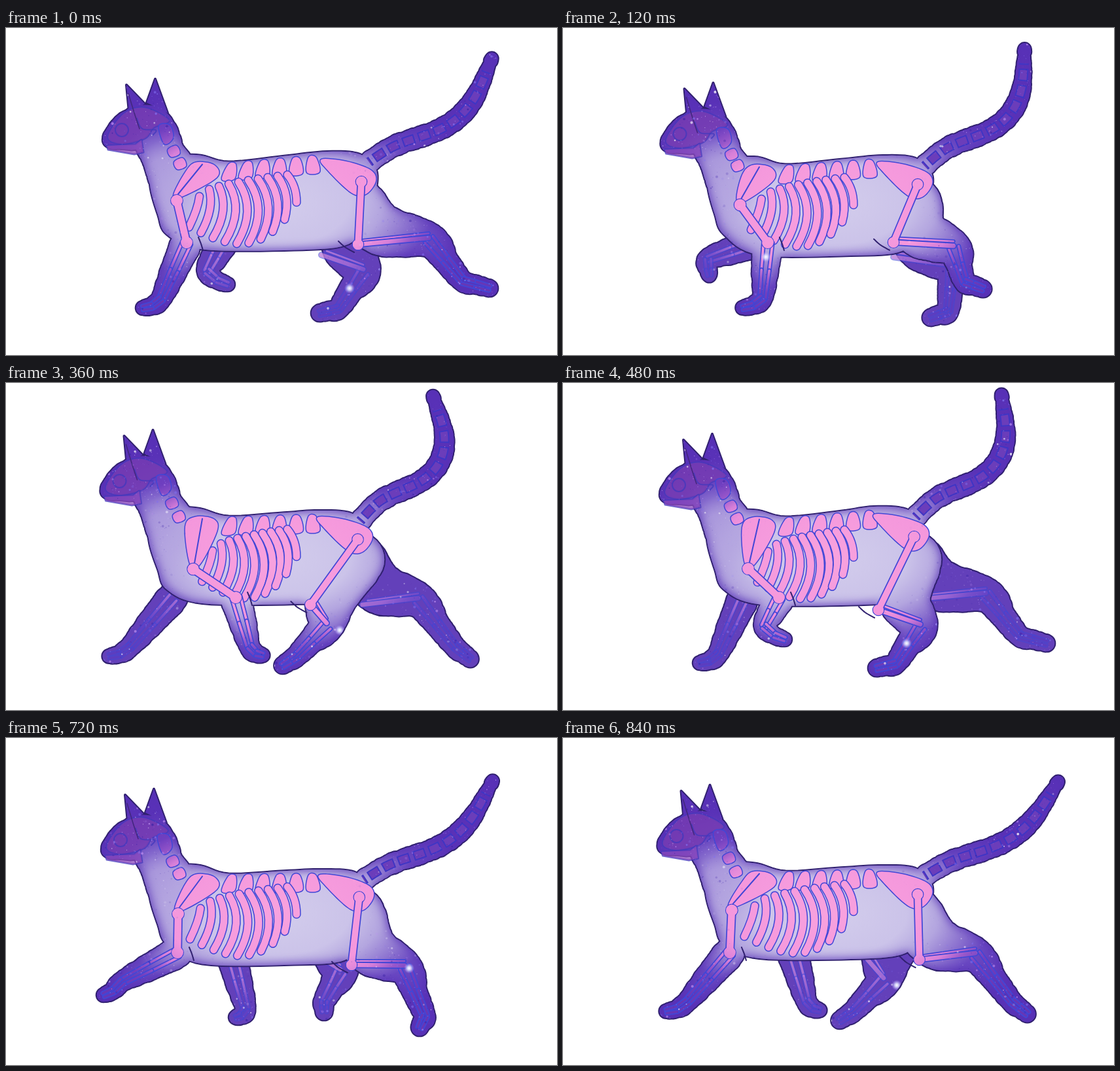
Animation of 842x500 px, one loop 0.96 s. Source, as an HTML page with a canvas:

```html
<!DOCTYPE html>
<html lang="en">
<head>
<meta charset="utf-8">
<title>Walking cat</title>
<style>
html, body { margin: 0; width: 100%; height: 100%; overflow: hidden; background: #fff; }
canvas { display: block; }
</style>
</head>
<body>
<canvas id="stage" width="842" height="500"></canvas>
<script>
const ctx = document.getElementById('stage').getContext('2d');
const W = 842, H = 500, STEP = 120, COUNT = 8;
const INK = '#30206f', BLUE = '#4146d6';

// ---- motion: every joint follows a mean plus two harmonics of the stride ----

const stride = phase => {
  const a = phase * 2 * Math.PI / COUNT;
  return (mean, c1 = 0, s1 = 0, c2 = 0, s2 = 0) => mean + c1 * Math.cos(a) + s1 * Math.sin(a)
    + c2 * Math.cos(2 * a) + s2 * Math.sin(2 * a);
};
const mid = (...pts) => [0, 1].map(k => pts.reduce((sum, p) => sum + p[k], 0) / pts.length);
const smooth = (from, to, u) => {
  const t = Math.max(0, Math.min(1, (u - from) / (to - from)));
  return t * t * (3 - 2 * t);
};

function foreLeg(phase) {
  const w = stride(phase);
  const elbow = [w(303, -27, 41), w(328)];
  const wrist = [w(272, -35, 94, 0, -9), w(393, 21, 21, 0, -10)];
  const toe = [w(262, -65, 101, 12, -13), w(410, 18, 17, 0, -7)];
  const [kx, ky] = mid(wrist, toe);
  return [[...elbow, 23], [...mid(elbow, wrist), 20], [...wrist, 15], [kx, ky + 4, 13], [...toe, 10]];
}

function hindLeg(phase) {
  const w = stride(phase);
  const hip = [537, 270];
  const knee = [w(505, 28, -28, 5), w(339, -8, -8)];
  const hock = [w(578, 50, -49, 18, 18), w(351, -24, 3, -3)];
  const ankle = [w(583, 95, -77, 20, 18), w(411, -21, -11, -3)];
  const toe = [w(584, 130, -73, 25, 18), w(424, -19, -12, -7, -3)];
  const points = [[...hip, 42], [...mid(hip, knee, hock), 39], [...hock, 26], [...mid(hock, ankle), 19],
    [...ankle, 15], [...mid(ankle, toe), 14], [...toe, 12]];
  return { points, knee };
}

// The tail is walked from its base: it dips, then curls up by an amount that sways.
function tailPoints([rx, ry], w) {
  const start = w(40, -5, 7), low = w(20, -2, 2), tip = w(83, -15, 21), count = 12, pts = [];
  let x = rx + 14, y = ry + 12;
  for (let i = 0; i <= count; i++) {
    const u = i / count, v = u + .5 / count;
    pts.push([x, y, 15 - 6 * smooth(.6, 1.05, u)]);
    const heading = start + (low - start) * smooth(.05, .28, v) + (tip - low) * smooth(.32, .9, v);
    x += 258 / count * Math.cos(heading * Math.PI / 180);
    y -= 258 / count * Math.sin(heading * Math.PI / 180);
  }
  return pts;
}

function poseAt(phase) {
  const w = stride(phase), far = phase + COUNT / 2;
  const rump = [w(533, 8), w(199, 0, 0, -6)];
  return {
    head: [w(-3, 0, 0, 1, 2.5), w(0, 0, 0, 0, 6)],
    back: w(206, 0, 0, -1.5, 2.5), belly: w(343, 0, 0, -3.5, 5),
    shoulder: [w(272, -11, 9), w(274, -10, 5)],
    rump, tail: tailPoints(rump, w),
    fore: foreLeg(phase), hind: hindLeg(phase), farFore: foreLeg(far), farHind: hindLeg(far)
  };
}

// ---- drawing helpers ----

function random(seed) {
  return () => {
    seed = (seed + 0x6D2B79F5) | 0;
    let t = Math.imul(seed ^ (seed >>> 15), 1 | seed);
    t = (t + Math.imul(t ^ (t >>> 7), 61 | t)) ^ t;
    return ((t ^ (t >>> 14)) >>> 0) / 4294967296;
  };
}

// Catmull-Rom samples, any number of coordinates per point.
function spline(pts, closed = false, steps = 8) {
  const n = pts.length, out = [];
  const at = i => closed ? pts[(i + n) % n] : pts[Math.max(0, Math.min(n - 1, i))];
  for (let i = 0; i < (closed ? n : n - 1); i++) {
    const [a, b, c, d] = [at(i - 1), at(i), at(i + 1), at(i + 2)];
    for (let s = 0; s < steps; s++) {
      const t = s / steps;
      out.push(b.map((v, k) => v + t / 2 * (c[k] - a[k]
        + t * (2 * a[k] - 5 * v + 4 * c[k] - d[k] + t * (3 * (v - c[k]) + d[k] - a[k])))));
    }
  }
  if (!closed) out.push(at(n - 1));
  return out;
}

function line(pts, closed = false) {
  const p = new Path2D();
  pts.forEach(([x, y], i) => i ? p.lineTo(x, y) : p.moveTo(x, y));
  if (closed) p.closePath();
  return p;
}
const curve = pts => line(spline(pts));
const blob = pts => line(spline(pts, true), true);

function discs(pts) {
  const p = new Path2D();
  for (const [x, y, r] of pts) {
    p.moveTo(x + r, y);
    p.arc(x, y, r, 0, 7);
  }
  return p;
}

// A tapered limb with a slightly ragged edge.
function tube(pts) {
  const rnd = random(7);
  return discs(spline(pts).map(([x, y, r]) => [x, y, r + (rnd() - .5) * 1.6]));
}

function join(...paths) {
  const p = new Path2D();
  paths.forEach(q => p.addPath(q));
  return p;
}

function stroke(path, color, width) {
  ctx.strokeStyle = color;
  ctx.lineWidth = width;
  ctx.stroke(path);
}

function outlined(path, fill, edge = INK, width = 4) {
  stroke(path, edge, width);
  ctx.fillStyle = fill;
  ctx.fill(path);
}

// ---- colour: an elliptical falloff, light at the ribs, deep at the extremities ----

const CX = 410, CY = 268, REACH = 330, SQUASH = .56;
const depth = (x, y) => Math.hypot(x - CX, (y - CY) / SQUASH) / REACH;

function radial(c, x, y, r, stops) {
  const g = c.createRadialGradient(x, y, 0, x, y, r);
  stops.forEach(([at, color]) => g.addColorStop(at, color));
  return g;
}

function shade(stops, neckGlow) {
  const layer = new OffscreenCanvas(W, H), c = layer.getContext('2d');
  c.setTransform(1, 0, 0, SQUASH, 0, CY);
  c.fillStyle = radial(c, CX, 0, REACH, stops);
  c.fillRect(0, -H, W, 2 * H);
  c.resetTransform();
  c.fillStyle = radial(c, 240, 228, 78, [[0, neckGlow], [.35, neckGlow], [1, '#b4a5e000']]);
  c.fillRect(0, 0, W, H);
  return ctx.createPattern(layer, 'no-repeat');
}
const fur = shade([[0, '#d3cdec'], [.35, '#cbc3e9'], [.5, '#b3a5df'], [.63, '#8e75d0'], [.75, '#6a48c2'], [1, '#5a32b8']], '#b4a5e0c0');
const bone = shade([[0, '#f8a2de'], [.5, '#f497dc'], [.62, '#d67fd8'], [.7, '#9a58ca'], [.8, '#6f3fc0'], [1, '#6437b8']], '#b4a5e000');
const farFur = '#6340ba';

const rimLayer = new OffscreenCanvas(W, H), rimCtx = rimLayer.getContext('2d');
function innerRim(path) {
  rimCtx.globalCompositeOperation = 'source-over';
  rimCtx.fillStyle = '#5530b4';
  rimCtx.fillRect(0, 0, W, H);
  rimCtx.globalCompositeOperation = 'destination-out';
  rimCtx.fill(path);
  ctx.save();
  ctx.clip(path);
  ctx.filter = 'blur(8px)';
  ctx.drawImage(rimLayer, 0, 0);
  ctx.restore();
}

// ---- the cat ----

function headPath([dx, dy]) {
  const ears = [[[190, 128], [186, 87], [214, 116]], [[217, 114], [230, 78], [249, 130]]];
  const skullTube = [[162, 171, 13], [190, 157, 29], [222, 154, 35], [243, 196, 34], [262, 232, 40]];
  const path = new Path2D();
  path.addPath(join(tube(skullTube), ...ears.map(e => line(e, true))), new DOMMatrix([1, 0, 0, 1, dx, dy]));
  return path;
}

function torsoPath({ head: [dx, dy], back, rump: [rx, ry], belly }) {
  return blob([[225 + dx, 200 + dy], [292 + dx / 2, 194 + dy / 2], [340, back], [425, (back + ry) / 2 - 3], [rx - 50, ry - 4],
    [rx, ry], [rx + 25, ry + 24], [rx + 22, 258], [rx + 4, 305], [518, belly - 7], [440, belly], [300, belly - 1],
    [246, 316], [232, 285], [221 + dx / 2, 240]]);
}

const plate = (pts, dx = 0, dy = 0) => outlined(blob(pts.map(([x, y]) => [x + dx, y + dy])), bone, BLUE, 3);

function rod(a, b, w) {
  const p = line([a, b]);
  stroke(p, BLUE, w);
  stroke(p, bone, w - 3.4);
}

function longBone(a, b, w) {
  const knobs = discs([a, b].map(([x, y]) => [x, y, w * .62]));
  outlined(knobs, bone, BLUE, 2.6);
  rod(a, b, w);
  ctx.fillStyle = bone;
  ctx.fill(knobs);
}

// Two slim bones side by side in each section of a lower leg.
function shankBones(leg) {
  for (let i = 0; i < leg.length - 1; i++) {
    const [x, y, r] = leg[i], [u, v, q] = leg[i + 1], len = Math.hypot(u - x, v - y) || 1;
    const nx = (y - v) / len, ny = (u - x) / len;
    for (const side of [-.32, .28])
      rod([x + nx * r * side, y + ny * r * side], [u + nx * q * side, v + ny * q * side], 7);
  }
}

function lowerBones(fore, { points, knee }) {
  const [hx, hy] = points[2];
  shankBones(fore);
  shankBones(points.slice(2));
  rod([knee[0] + 8, knee[1] - 6], [hx, hy - 10], 6);
  rod(knee, [hx, hy - 3], 10);
}

function skull([dx, dy]) {
  const edge = '#4038bd';
  ctx.save();
  ctx.translate(dx, dy);
  ctx.globalAlpha = .75;
  outlined(blob([[158, 166], [182, 131], [214, 122], [251, 141], [228, 152], [214, 169], [178, 177]]), '#7a3db2', edge, 3);
  outlined(line([[156, 180], [200, 178], [209, 171], [212, 190], [198, 193], [158, 186]], true), '#8b49bc', edge, 3);
  stroke(discs([[179, 156, 10]]), edge, 2);
  stroke(curve([[202, 138], [210, 154], [231, 156], [226, 164]]), edge, 2);
  ctx.globalAlpha = 1;
  stroke(curve([[189, 100], [199, 133], [206, 154]]), '#43277f', 1.6);
  ctx.restore();
  plate([[236, 150], [252, 149], [257, 168], [244, 177]], dx, dy);
  for (const [x, y, follow] of [[258, 189, .8], [267, 208, .5]])
    plate([[x - 9, y - 3], [x + 4, y - 9], [x + 9, y + 3], [x - 4, y + 8]], dx * follow, dy * follow);
}

function ribs({ back, shoulder }) {
  const drop = back - 204, lean = (shoulder[0] - 264) * .8;
  for (let i = 0; i < 10; i++) {
    const t = i / 9, shift = lean * (1 - t);
    const x0 = 298 + 132 * t + shift, y0 = 257 - 33 * Math.sqrt(t) + drop;
    const x1 = 282 + 162 * t + shift, y1 = 304 + 80 * t - 118 * t ** 3 + drop;
    const rib = new Path2D();
    rib.moveTo(x0, y0);
    rib.quadraticCurveTo((x0 + x1) / 2 + 40 * Math.sin(.4 + 2.3 * t) - 10, (y0 + y1) / 2 - 4, x1, y1);
    stroke(rib, BLUE, 13.5);
    stroke(rib, bone, 10.5);
  }
}

function spine({ back, rump }) {
  for (let i = 0; i < 6; i++) {
    const x = 333 + i * 26, y = back + 4 + (rump[1] - back + 1) * i / 5, lean = 7 - 1.5 * i;
    plate([[x + lean, y], [x + 11 + lean, y], [x + 16, y + 22], [x - 3, y + 23]]);
  }
}

function tailBones(tail) {
  const p = curve(tail.slice(0, -1));
  ctx.lineCap = 'butt';
  for (const [color, width, dash] of [['#3f35c4', 15, 19], ['#6b3dba', 11, 15]]) {
    ctx.setLineDash([dash, 25 - dash]);
    ctx.lineDashOffset = dash / 2 - 19;
    stroke(p, color, width);
  }
  ctx.setLineDash([]);
  ctx.lineCap = 'round';
}

function skeleton(pose) {
  const { head, back, rump, shoulder: [sx, sy], tail, fore, hind } = pose;
  const drop = back - 204, px = (rump[0] - 541) * .4, py = (rump[1] - 193) * .7;
  tailBones(tail);
  skull(head);
  spine(pose);
  ribs(pose);
  plate([[482, 201], [520, 204], [557, 217], [565, 234], [550, 254], [528, 252], [492, 218]], px, py);
  plate([[sx - 5, sy - 8], [274, 220 + drop], [290, 205 + drop], [318, 209 + drop], [322, 228 + drop], [sx + 10, sy - 7]]);
  stroke(line([[sx + 2, sy - 10], [300, 208 + drop]]), BLUE, 2);
  lowerBones(fore, hind);
  longBone([sx, sy], fore[0], 14);
  longBone([543 + px, 235 + py], hind.knee, 13);
}

// The star field repeats every four steps and stays put on the stage.
const brightStars = [[525, 398], [310, 350], [616, 352], [510, 378]];
function sparkle(phase) {
  const rnd = random(91 + phase);
  for (let i = 0; i < 4200; i++) {
    const x = 130 + rnd() * 650, y = 16 + rnd() * 444, size = .5 + rnd() ** 6 * 1.6, tone = rnd();
    ctx.globalAlpha = Math.max(0, Math.min(1, (depth(x, y) - .4) * 2.5)) * (.15 + .65 * rnd());
    ctx.fillStyle = tone < .2 ? '#fff' : tone < .5 ? '#bb8cf0' : tone < .75 ? '#8170f0' : '#3d25a8';
    ctx.fill(discs([[x, y, size]]));
  }
  ctx.globalAlpha = 1;
  const [x, y] = brightStars[phase];
  ctx.fillStyle = radial(ctx, x, y, 8, [[0, '#fff'], [.35, '#dfe2ffdd'], [1, '#b9a6ff00']]);
  ctx.fillRect(x - 8, y - 8, 16, 16);
}

function draw(index) {
  const pose = poseAt(index), { fore, hind, farFore, farHind, tail, head } = pose;
  ctx.fillStyle = '#fff';
  ctx.fillRect(0, 0, W, H);
  ctx.lineCap = ctx.lineJoin = 'round';

  const far = join(tube(farFore), tube(farHind.points));
  outlined(far, farFur);
  ctx.globalAlpha = .55;
  lowerBones(farFore, farHind);
  ctx.globalAlpha = 1;

  const near = join(tube(tail), tube(fore), tube(hind.points), torsoPath(pose), headPath(head));
  outlined(near, fur);
  innerRim(near);
  skeleton(pose);

  const [ex, ey] = fore[0], [kx, ky] = hind.knee;
  stroke(curve([[ex + 18, ey - 8], [ex + 22, ey + 2], [ex + 25, ey + 12]]), INK, 2);
  stroke(curve([[kx - 30, ky - 5], [kx - 20, ky + 4], [kx - 6, ky + 12]]), INK, 2);

  ctx.save();
  ctx.clip(join(far, near));
  sparkle(index % 4);
  ctx.restore();
}

let shown = -1;
function tick() {
  const index = Math.floor(performance.now() / STEP) % COUNT;
  if (index !== shown) draw(shown = index);
  requestAnimationFrame(tick);
}
tick();
</script>
</body>
</html>
```
